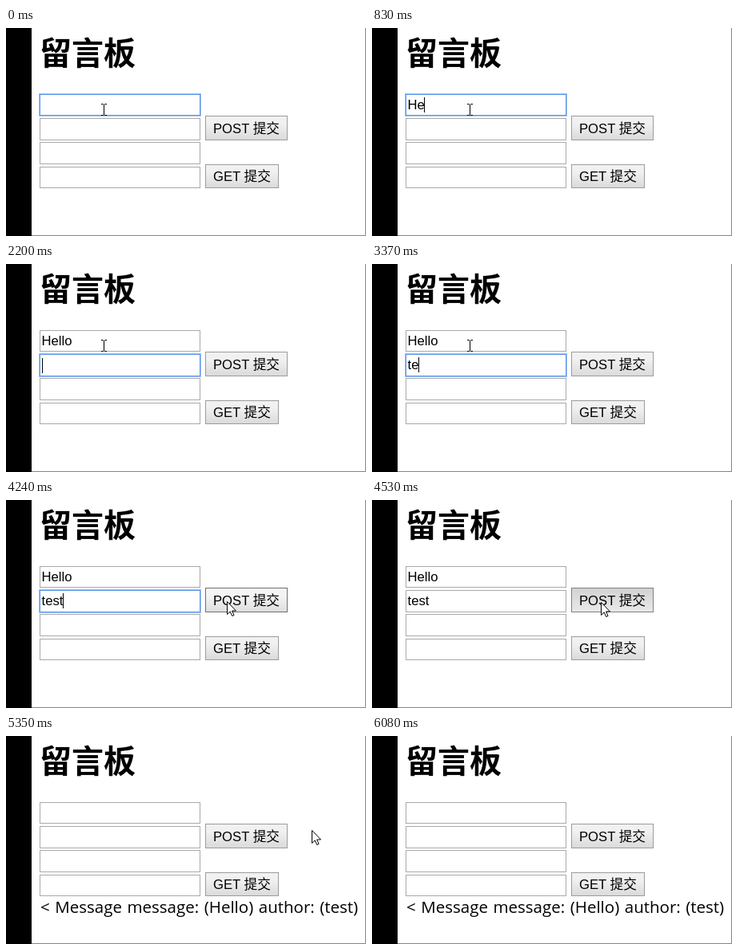
Animation of 450x261 px, one loop 6330 ms. Source, as an HTML page:

```html
<!DOCTYPE html>
<html lang="zh-CN">
<head>
<meta charset="utf-8">
<title>留言板</title>
<style>
  html, body { margin: 0; height: 100%; overflow: hidden; background: #fff; }
  svg { display: block; }
  rect { shape-rendering: crispEdges; }
  text { font: 16.67px "Liberation Sans", "Noto Sans CJK SC", "Noto Sans CJK", sans-serif; white-space: pre; }
  .title { font: bold 40px "Noto Sans CJK SC", "Noto Sans CJK", sans-serif; }
  .message { font: 20.5px "Open Sans", "Noto Sans", sans-serif; word-spacing: 1.2px; }
  .box { fill: #fff; stroke: #a9a9a9; }
  .button { fill: url(#idle); stroke: #9c9c9c; }
  .button.hover { fill: url(#lit); stroke: #707070; }
  .button.down { fill: url(#pressed); stroke: #808080; }
</style>
</head>
<body>
<svg width="450" height="261" viewBox="0 0 450 261">
  <defs>
    <linearGradient id="idle" x2="0" y2="1"><stop offset=".3" stop-color="#f1f1f1"/><stop offset="1" stop-color="#dadada"/></linearGradient>
    <linearGradient id="lit" x2="0" y2="1"><stop offset=".3" stop-color="#f4f4f4"/><stop offset="1" stop-color="#dedede"/></linearGradient>
    <linearGradient id="pressed" x2="0" y2="1"><stop offset="0" stop-color="#d2d2d2"/><stop offset="1" stop-color="#e9e9e9"/></linearGradient>
  </defs>
  <rect width="32" height="261"/>
  <path d="M449.5 0V260.5H32" fill="none" stroke="#858585"/>
  <text class="title" x="42" y="46">留言板</text>

  <rect class="box" x="42.5" y="83.5" width="200" height="26"/>
  <rect class="box" x="42.5" y="113.5" width="200" height="27"/>
  <rect class="box" x="42.5" y="143.5" width="200" height="27"/>
  <rect class="box" x="42.5" y="174.5" width="200" height="26"/>
  <g id="ring" fill="none">
    <rect id="glow" x="41.5" width="202" rx="1" stroke="#9cc0f3"/>
    <rect id="edge" x="42.5" width="200" stroke="#5b96e8"/>
  </g>
  <text id="line0" x="44.5" y="102"></text>
  <text id="line1" x="44.5" y="132"></text>
  <rect id="caret" width="1" height="19"/>

  <rect id="post" class="button" x="249.5" y="110.5" width="102" height="30"/>
  <text x="259" y="132">POST 提交</text>
  <rect class="button" x="249.5" y="171.5" width="91" height="29"/>
  <text x="259" y="192">GET 提交</text>
  <text id="message" class="message" x="43" y="222">&lt; Message message: (Hello) author: (test)</text>

  <path id="beam" d="M119 95.5h2.5l1 1 1-1h2.5M122.5 96v13M119 109.5h2.5l1-1 1 1h2.5" fill="none" stroke="#000"/>
  <path id="arrow" d="M.5 .5V16.5L4.2 13 6.7 18.5 9 17.5 6.6 12H11.5Z" fill="#fff" stroke="#000"/>
</svg>
<script>
const LOOP = 6330;
const $ = id => document.getElementById(id);
const show = (id, on) => $(id).style.display = on ? "" : "none";

const keys = [[550, 830, 1080, 1360, 1610], [2970, 3370, 3650, 3960]];
const words = ["Hello", "test"];
const SWITCH = 2200, PRESS = 4530, RELEASE = 4650, SENT = 4920;

// time, x, y of the pointer tip
const moves = [
  [3960, 181, 142], [4110, 260, 130], [4240, 276, 127], [4380, 286, 128],
  [SENT, 300, 132], [5040, 373, 167], [5200, 438, 189], [5350, 382, 118],
  [5510, 404, 40], [5650, 406, 25], [5800, 322, 224]
];

function draw(t) {
  const typed = words.map((word, i) =>
    t < SENT ? word.slice(0, keys[i].filter(k => k <= t).length) : "");
  typed.forEach((s, i) => $("line" + i).textContent = s);

  const field = t < SWITCH ? 0 : 1;
  const focused = t < PRESS;
  const top = [83, 113][field], height = [27, 28][field];
  show("ring", focused);
  $("glow").setAttribute("y", top - .5);
  $("glow").setAttribute("height", height + 1);
  $("edge").setAttribute("y", top + .5);
  $("edge").setAttribute("height", height - 1);

  const blink = t < 150 || t >= 2700 && t < 2970 || t >= 4380;
  show("caret", focused && !blink);
  const width = typed[field] ? $("line" + field).getComputedTextLength() : 0;
  $("caret").setAttribute("x", Math.max(45, Math.floor(44.5 + width)));
  $("caret").setAttribute("y", field ? (typed[1] ? 117 : 118) : 87);

  const pressed = t >= PRESS && t < RELEASE;
  const hover = t >= 4110 && t < 5040;
  $("post").setAttribute("class", "button" + (pressed ? " down" : hover ? " hover" : ""));
  show("message", t >= SENT);

  const spot = moves.filter(m => m[0] <= t).pop();
  show("beam", !spot);
  show("arrow", spot && t < 6080);
  if (spot) $("arrow").setAttribute("transform", `translate(${spot[1]} ${spot[2]})`);
}

const start = performance.now();
function tick() {
  draw((performance.now() - start) % LOOP);
  requestAnimationFrame(tick);
}
tick();
</script>
</body>
</html>
```
